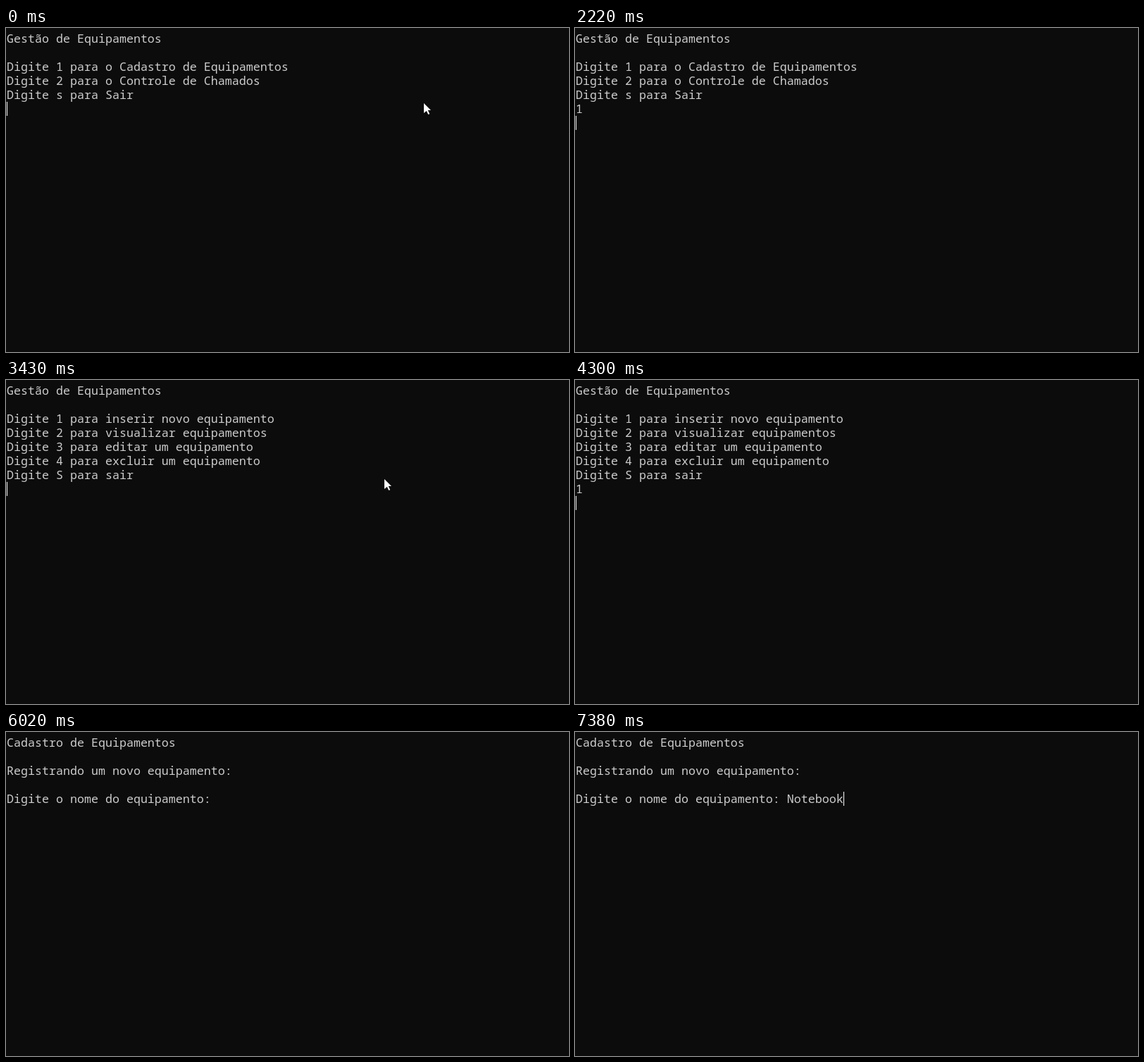
Write an HTML page with a canvas that moves like this. It is 799 by 461 pixels and loops after 8000 ms.

```html
<!DOCTYPE html>
<html lang="pt-BR">
<head>
<meta charset="utf-8">
<title>Gestão de Equipamentos</title>
<style>
  html, body { margin: 0; width: 100%; height: 100%; overflow: hidden; background: #0c0c0c; }
  canvas { display: block; }
</style>
</head>
<body>
<canvas id="stage" width="799" height="461"></canvas>
<script>
const ctx = document.getElementById('stage').getContext('2d');
const LOOP = 8000, CELL = 10, ROW = 20, LEFT = 1, TOP = 5;

const mainMenu = `Gestão de Equipamentos

Digite 1 para o Cadastro de Equipamentos
Digite 2 para o Controle de Chamados
Digite s para Sair
`;
const equipmentMenu = `Gestão de Equipamentos

Digite 1 para inserir novo equipamento
Digite 2 para visualizar equipamentos
Digite 3 para editar um equipamento
Digite 4 para excluir um equipamento
Digite S para sair
`;
const form = `Cadastro de Equipamentos

Registrando um novo equipamento:

Digite o nome do equipamento: `;

// [start time, terminal text, caret visible]; the caret sits after the text
const states = [
  [0, mainMenu, true],
  [650, mainMenu, false],
  [1130, mainMenu + '1', true],
  [1670, mainMenu + '1', false],
  [2220, mainMenu + '1\n', true],
  [2290, equipmentMenu, true],
  [2880, equipmentMenu, false],
  [3430, equipmentMenu, true],
  [4030, equipmentMenu, false],
  [4100, equipmentMenu + '1', true],
  [4300, equipmentMenu + '1\n', true],
  [4370, form, true],
  [4960, form, false],
  [5490, form, true],
  [6020, form, false],
  [6220, form, true],
  [6420, form + 'N', true],
  [6620, form + 'No', true],
  [6690, form + 'Not', true],
  [6820, form + 'Note', true],
  [7020, form + 'Notebo', true],
  [7220, form + 'Noteboo', true],
  [7380, form + 'Notebook', true]
];

const arrow = new Path2D('M0 0 L10 10 H5.8 L8.2 15.2 L6.2 16 L3.8 11 L0 14 Z');

function drawTerminal(text, caretOn) {
  const lines = text.split('\n');
  ctx.font = '16.667px "Noto Sans Mono", "DejaVu Sans Mono", monospace';
  ctx.fillStyle = '#cccccc';
  lines.forEach((line, i) => ctx.fillText(line, LEFT, TOP + i * ROW + 16));
  if (caretOn) {
    const row = lines.length - 1;
    ctx.fillStyle = '#ffffff';
    ctx.fillRect(LEFT + lines[row].length * CELL, TOP + row * ROW, 1, ROW);
  }
}

function drawPointer(t) {
  const visible = t < 2220 || (t >= 2550 && t < 4030);
  if (!visible) return;
  const step = Math.min(11, Math.max(0, Math.floor((t - 650) / 68)));
  const eased = 1 - (1 - step / 11) ** 2.38;
  ctx.save();
  ctx.translate(Math.round(593 - 56 * eased), Math.round(107 + 34 * eased));
  ctx.fillStyle = '#ffffff';
  ctx.fill(arrow);
  ctx.restore();
}

function draw(t) {
  ctx.fillStyle = '#0c0c0c';
  ctx.fillRect(0, 0, 799, 461);
  const [, text, caretOn] = states.findLast(([start]) => start <= t);
  drawTerminal(text, caretOn);
  drawPointer(t);
}

function tick() {
  draw(performance.now() % LOOP);
  requestAnimationFrame(tick);
}
tick();
</script>
</body>
</html>
```
